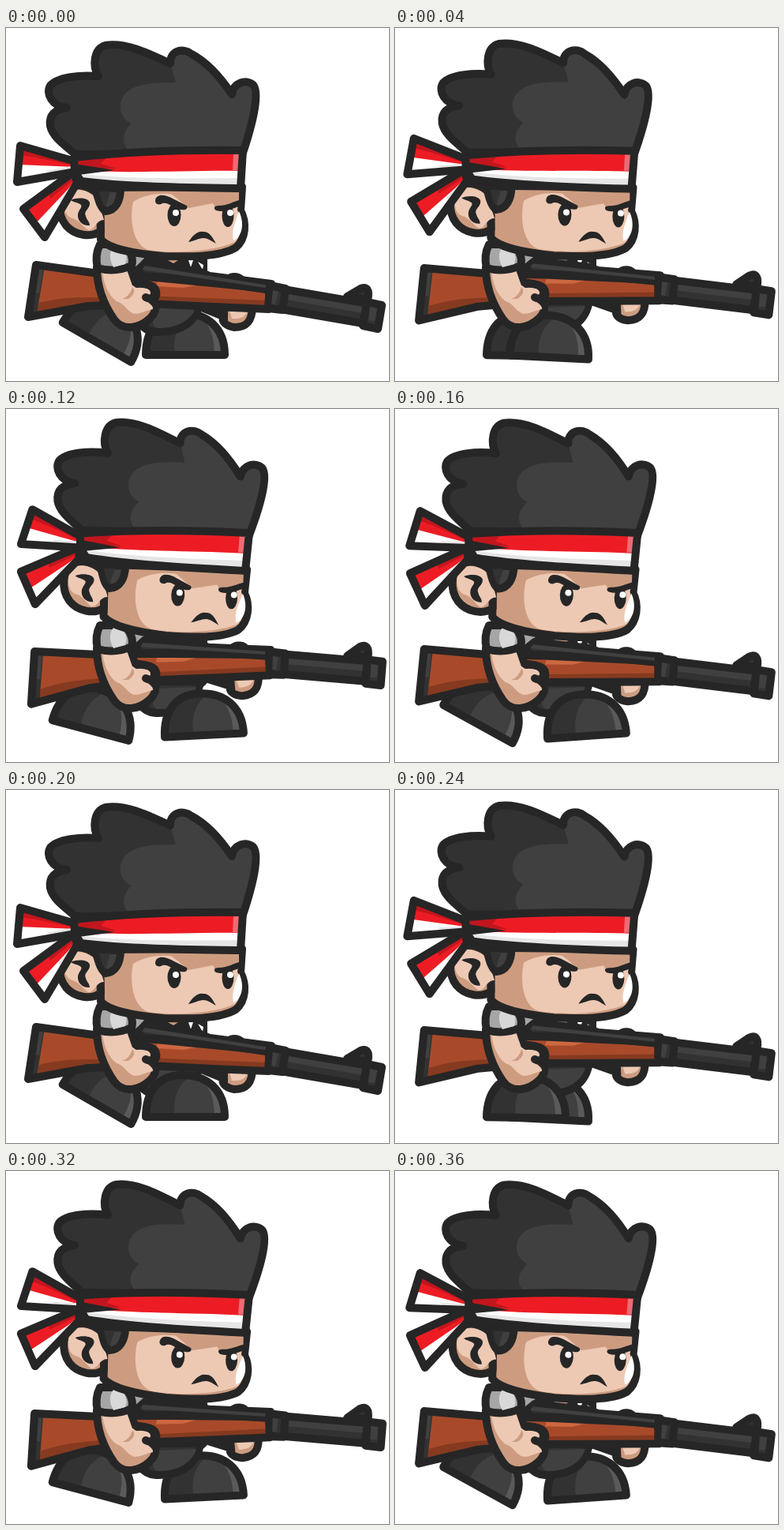
An HTML page that plays this animation: 485x447 px, repeating every 400 ms.

```html
<!DOCTYPE html>
<html lang="en">
<head>
<meta charset="utf-8">
<title>Crouch walk</title>
<style>
html, body { margin: 0; width: 100%; height: 100%; overflow: hidden; background: #fff; }
svg { display: block; width: 485px; height: 447px; }
.line { stroke: #262626; stroke-width: 10; stroke-linejoin: round; stroke-linecap: round; }
.ink { fill: #262626; }
.dark { fill: #323232; }
.grey { fill: #404040; }
.skin { fill: #edc9b4; }
.tan { fill: #cd9c80; }
.red { fill: #ed1c24; }
.deep { fill: #c1161d; }
.white { fill: #fff; }
.pale { fill: #e6e6e6; }
.wood { fill: #a84a2a; }
.bark { fill: #863a20; }
.none { fill: none; }
</style>
</head>
<body>
<svg viewBox="0 0 485 447">
  <defs>
    <g id="boot">
      <path class="dark" d="M-50 0C-50-30-36-53-4-53C28-53 50-34 50 0Z"/>
      <path class="grey" d="M-13 0C-16-18-12-36 2-48C30-47 49-30 50 0Z"/>
      <path d="M24-43C34-32 37-18 37 0H50C49-24 40-37 24-43Z" fill="#5a5a5a"/>
      <path class="line none" d="M-50 0C-50-30-36-53-4-53C28-53 50-34 50 0Z"/>
    </g>
  </defs>

  <use id="farFoot" href="#boot"/>

  <g id="body">
    <path class="line ink" d="M166 288L250 288L250 345L230 362L160 360Z"/>
    <path class="line dark" d="M164 345H246C242 372 222 386 190 385C172 384 163 370 164 345Z"/>
    <path class="grey" d="M186 354L241 352C235 371 216 380 193 380C183 378 186 366 186 354Z"/>
    <path d="M160 281H185L164 303Z" fill="#a6a6a6"/>
    <path class="tan" d="M192 287H229L212 298Z"/>
    <path class="white" d="M231 294L237 294L234 303ZM243 296L250 300L249 306Z"/>
  </g>

  <use id="nearFoot" href="#boot"/>

  <g id="gun">
    <g id="farHand">
      <path class="line tan" d="M243 344L312 352C312 372 304 379 289 379C277 377 273 371 275 365L243 352Z"/>
      <path class="skin" d="M282 353L306 357C304 365 298 369 286 368Z"/>
      <path class="line none" d="M276 352V369"/>
      <path class="line ink" d="M281 318C287 313 297 314 300 322Z"/>
    </g>
    <path class="wood" d="M38 300L118 311L190 316L333 330V356L262 353L180 349L104 352L28 366Z"/>
    <path class="bark" d="M42 348C90 336 110 345 150 338L331 345V356L180 349L104 351L38 362Z"/>
    <path d="M192 321L250 324L225 329L190 327Z" fill="#cd6740"/>
    <path class="dark" d="M38 300L49 302L39 362L28 366Z"/>
    <path class="grey" d="M42 304L47 305L42 336L37 335Z"/>
    <path class="line none" d="M38 300L118 311L190 316L333 330V356L262 353L180 349L104 352L28 366Z"/>
    <path class="line dark" d="M163 309L178 298L246 309L258 314L336 324V332L246 319L175 314Z"/>
    <path class="grey" d="M176 301L245 312L334 326V330L248 317L172 306Z"/>
    <path class="line dark" d="M432 340L449 330C457 327 461 332 458 344Z"/>
    <path class="line dark" d="M352 331L456 349L452 374L348 356Z"/>
    <path class="grey" d="M357 337L453 353L452 361L355 344Z"/>
    <path class="line dark" d="M334 326L354 330L350 357L332 355Z"/>
    <path class="grey" d="M338 332L345 334L341 350L336 349Z"/>
    <path class="line dark" d="M457 347L476 351L471 381L452 377Z"/>
    <path class="grey" d="M461 353L470 355L467 371L459 370Z"/>
  </g>

  <g id="arm">
    <path class="line tan" d="M115 303C115 326 123 349 137 369C148 384 168 381 182 368C190 360 192 351 185 345C193 341 192 329 183 326L163 322L156 302Z"/>
    <path class="skin" d="M122 307L153 306L160 326C170 331 184 327 187 335C187 342 178 345 171 341C179 349 187 350 186 356C176 358 166 364 160 361C152 357 150 349 140 346C129 338 123 322 122 307Z"/>
    <path class="tan" d="M147 343C154 341 159 334 160 328C164 332 163 338 155 343Z"/>
    <path class="line none" d="M166 324C177 322 188 327 188 335C188 342 183 344 177 341"/>
    <path class="line" d="M119 274H150C158 283 162 292 159 301C145 307 130 308 116 304C113 292 115 282 119 274Z" fill="#a6a6a6"/>
    <path d="M136 277C151 278 155 288 151 299L136 303C130 292 131 283 136 277Z" fill="#d8d8d8"/>
  </g>

  <g id="head">
    <path class="line tan" d="M119 202L299 201L297 231C305 246 304 267 291 278C271 290 233 290 200 289C164 286 132 281 120 268Z"/>
    <path class="skin" d="M161 220C184 206 215 208 232 217H295L293 230C300 246 299 262 290 271C261 284 208 286 180 281C158 273 157 237 161 220Z"/>
    <path class="tan" d="M205 207H295V218L266 229L262 222L231 228L217 216Z"/>
    <path class="white" d="M295 232C302 246 300 264 288 269C285 257 290 246 295 232Z"/>
    <path class="line tan" d="M120 257C108 266 87 263 76 250C64 235 66 211 78 203C90 195 108 201 118 212Z"/>
    <path class="skin" d="M79 208C90 201 106 207 113 214C119 228 123 238 124 243C114 243 113 256 104 256C96 250 92 243 84 241C71 237 71 216 79 208Z"/>
    <path class="ink" d="M82 218C91 214 104 215 106 221C107 229 98 231 101 238C102 243 106 245 106 250C97 251 90 244 91 236C92 230 97 227 95 224C92 221 86 221 82 218Z"/>
    <path class="line grey" d="M113 203H145C145 219 139 231 126 232C119 227 117 216 113 203Z"/>
    <path class="dark" d="M118 207H132L126 227C121 222 120 214 118 207Z"/>

    <path class="ink" d="M189 219C190 209 202 211 211 216L229 225C231 229 227 231 222 230C211 229 207 220 198 222C194 225 189 223 189 219Z"/>
    <path class="ink" d="M298 217L297 225C286 229 277 234 266 231C262 228 264 225 269 225C280 225 287 220 298 217Z"/>
    <ellipse class="ink" cx="213" cy="237" rx="8.5" ry="14"/>
    <ellipse class="ink" cx="281" cy="238" rx="7.5" ry="14"/>
    <circle class="white" cx="215" cy="234" r="4"/>
    <circle class="white" cx="284" cy="234" r="4"/>
    <path class="ink" d="M231 271C237 262 243 257 249 258C257 257 261 264 266 273C259 269 255 266 250 266C244 266 238 270 231 271Z"/>

    <path id="hair" class="dark" d="M88 160C74 148 59 138 56 124C54 110 62 103 77 101C58 99 50 83 56 73C65 62 94 59 117 61C109 48 111 26 126 22C152 18 180 32 208 45C207 29 224 24 235 33C254 43 272 63 286 84C288 69 304 64 313 72C323 83 309 131 300 158Z"/>
    <path class="grey" d="M208 45C207 29 224 24 235 33C254 43 272 63 286 84C288 69 304 64 313 72C323 83 309 131 300 158H158C145 146 147 133 159 121C143 114 140 94 152 82C167 69 191 69 215 69Z"/>
    <use href="#hair" class="line" fill-opacity="0"/>

    <g id="ribbons">
      <path class="white" d="M86 182L22 229L49 265L90 196Z"/>
      <path class="red" d="M86 182L22 229L37 248L90 192Z"/>
      <path class="deep" d="M86 182L52 207L56 216L89 189Z"/>
      <path class="pale" d="M90 196L73 225L66 220L88 192Z"/>
      <path class="line none" d="M86 182L22 229L49 265L90 196Z"/>
      <path class="white" d="M18 149L88 169V182L14 195Z"/>
      <path class="red" d="M18 149L88 169V176L16 173Z"/>
      <path class="deep" d="M18 149L88 169V174C66 170 44 164 17 161Z"/>
      <path class="pale" d="M88 174L50 181L63 185L88 182Z"/>
      <path class="line none" d="M18 149L88 169V182L14 195Z"/>
    </g>

    <path class="white" d="M86 164C150 157 225 154 300 155L297 203C230 202 150 201 95 194L87 182Z"/>
    <path class="red" d="M86 164C150 157 225 154 300 155V181C240 180 170 184 95 181Z"/>
    <path class="deep" d="M86 166L128 163L120 172L140 178L88 178Z"/>
    <path d="M288 158H296V180H287Z" fill="#ee6b73"/>
    <path class="pale" d="M96 185C150 191 230 191 294 190V200C220 200 150 199 98 191Z"/>
    <path class="ink" d="M86 172L138 180L92 186Z"/>
    <path class="line none" d="M86 164C150 157 225 154 300 155L297 203C230 202 150 201 95 194L87 182Z"/>
  </g>
</svg>
<script>
const STEP = 40;
// One boot's stride: ground centre x, y and tilt. The other boot is half a stride away.
const stride = [
  [115, 398, 30], [195, 417, 3], [249, 413.5, -2], [251, 413, -3], [243, 414, -4],
  [227, 414, 0], [166, 415, 1], [120, 413.5, 5], [107, 407, 15], [105, 399, 29]
];
const headSway = [0, .45, .92, 1.1, 1];
const gunLift = [0, .57, 1, 1, .57];

const place = (id, transform) => document.getElementById(id).setAttribute('transform', transform);

function placeFoot(id, step) {
  const [x, y, tilt] = stride[step % 10];
  place(id, `translate(${x} ${y}) rotate(${tilt})`);
}

function draw(now) {
  const step = Math.floor(now / STEP) % 10;
  const sway = headSway[step % 5];
  const lift = gunLift[step % 5];
  placeFoot('nearFoot', step);
  placeFoot('farFoot', step + 5);
  place('head', `translate(${2.7 * sway} 0) rotate(${2.1 * sway} 250 280)`);
  place('ribbons', `rotate(${10 * sway} 88 176)`);
  place('gun', `rotate(${-5 * lift} 118 325)`);
  place('farHand', `translate(${6 * lift} 0)`);
  requestAnimationFrame(draw);
}
draw(0);
</script>
</body>
</html>
```
